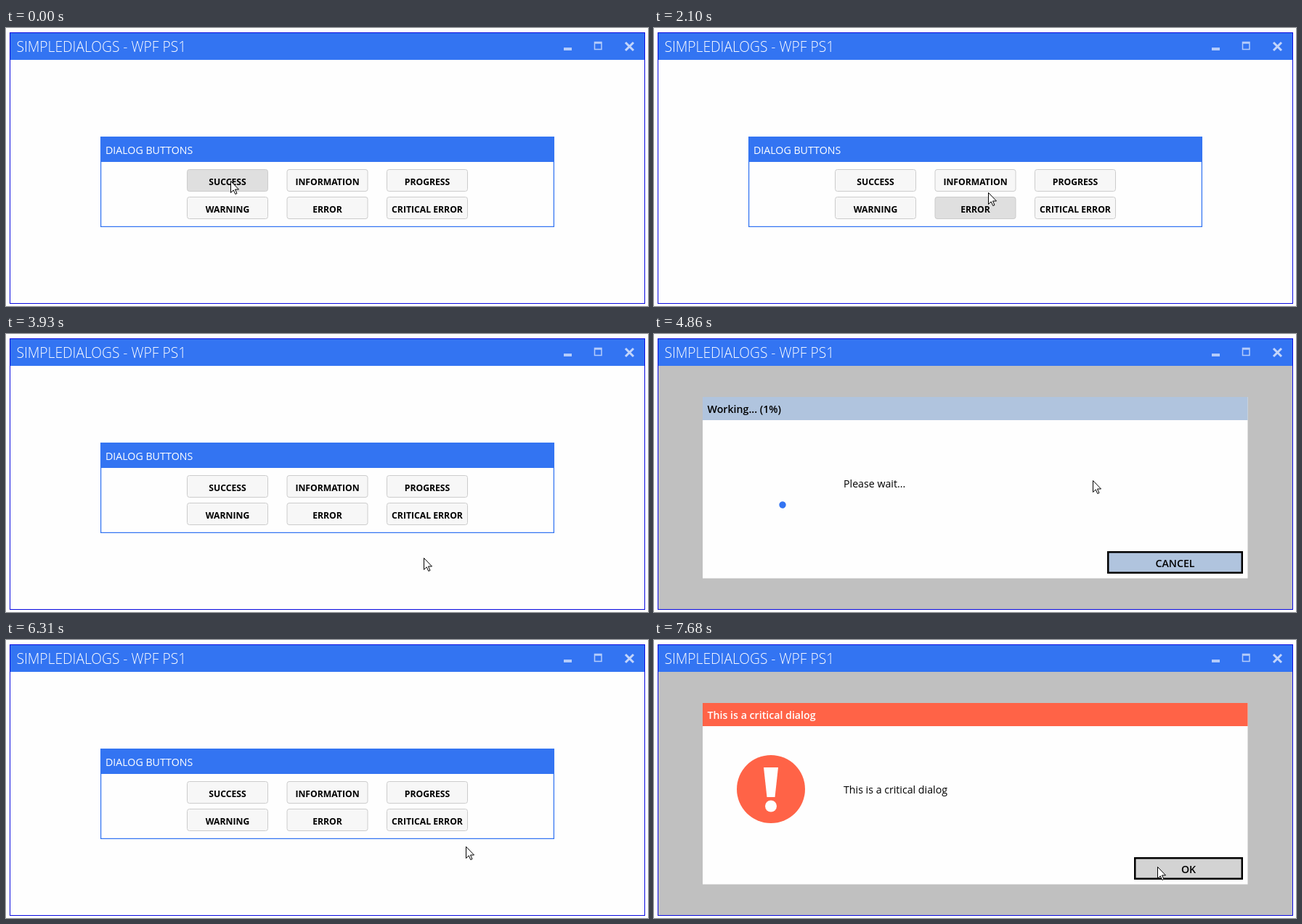
Animation of 884x384 px, one loop 8 s. Source, as an HTML page:

```html
<!DOCTYPE html>
<html lang="en">
<head>
<meta charset="utf-8">
<title>Dialogs</title>
<style>
  html, body { margin: 0; width: 100%; height: 100%; overflow: hidden; background: #fefefe; }
  svg { display: block; width: 884px; height: 384px; font-family: "Open Sans", "Noto Sans", sans-serif; font-size: 14.2px; }
  .caption { font-size: 12.2px; font-weight: 700; text-anchor: middle; }
  .strong { font-weight: 600; }
  .middle { text-anchor: middle; }
</style>
</head>
<body>
<svg id="stage" viewBox="0 0 884 384"></svg>
<script>
const LOOP = 8000;
const BLUE = '#3374f2', PAPER = '#fefefe', HOVER = '#d3d3d3';
const HOVER_LAG = 45;
const SPIN_START = 4710;

// Pointer path: time, x, y
const PATH = [
  [0, 309, 211], [59, 309, 211], [60, 308, 210], [630, 308, 210],
  [850, 490, 262], [1060, 659, 307], [1250, 690, 315], [1670, 690, 315],
  [1880, 585, 276], [2060, 468, 234], [2100, 460, 227], [2370, 452, 215],
  [2870, 452, 215], [3200, 532, 276], [3510, 575, 309], [3990, 575, 309],
  [4220, 590, 252], [4440, 604, 202], [5050, 604, 202], [5600, 652, 314],
  [5700, 655, 315], [6130, 655, 315], [6310, 633, 285], [6480, 624, 263],
  [6750, 599, 251], [7250, 599, 251], [7680, 693, 313], [8000, 693, 313]
];

const CHECK = 'M10 17l-5-5 1.41-1.41L10 14.17l7.59-7.59L19 8z';
const INFO = 'M11 7h2v2h-2zM11 11h2v6h-2z';
const materialIcon = d =>
  `<path d="${d}" fill="${PAPER}" transform="translate(161 206) scale(4.7) translate(-12 -12)"/>`;
const exclamation =
  `<path d="M151 176H171L166.500 217H155.500Z" fill="${PAPER}"/><circle cx="161" cy="229.500" r="8" fill="${PAPER}"/>`;

const DIALOGS = [
  { from: 440, to: 1440, color: '#9acd32', ink: '#fff', title: 'This is a success dialog',
    icon: materialIcon(CHECK), buttons: [['OK', 661, 150]], overlay: true },
  { from: 2510, to: 3930, color: '#6495ed', ink: '#fff', title: 'This is an information dialog',
    icon: materialIcon(INFO), buttons: [['OK', 505, 150], ['CANCEL', 661, 150]], overlay: false },
  { from: 4860, to: 6130, color: '#b0c4de', ink: '#000', title: 'Working... (1%)', text: 'Please wait...',
    spinner: true, buttons: [['CANCEL', 624, 187]], overlay: true },
  { from: 6960, to: LOOP, color: '#ff6347', ink: '#fff', title: 'This is a critical dialog',
    icon: exclamation, buttons: [['OK', 661, 150]], overlay: true }
];

const MENU = ['SUCCESS', 'INFORMATION', 'PROGRESS', 'WARNING', 'ERROR', 'CRITICAL ERROR'].map((label, i) => ({
  label, x: 249 + (i % 3) * 137.5, y: 195 + Math.floor(i / 3) * 38, w: 112, h: 31
}));

const rect = (x, y, w, h, attrs) => `<rect x="${x}" y="${y}" width="${w}" height="${h}" ${attrs}/>`;
const text = (x, y, label, attrs = '') => `<text x="${x}" y="${y}" ${attrs}>${label}</text>`;

const windowFrame = () =>
  rect(5.5, 6.5, 874, 374, `fill="${PAPER}" stroke="#0a0ae0"`) +
  rect(6, 7, 873, 37, `fill="${BLUE}"`) +
  text(14.5, 33, 'SIMPLEDIALOGS - WPF PS1', 'font-size="19.2" font-weight="300" fill="#fff"') +
  rect(768, 27, 11, 4, 'fill="#b4cbfa"') +
  '<path d="M810.500 19.500H820V29.500H810.500ZM810 21H820.500" fill="none" stroke="#b4cbfa" stroke-width="1.500"/>' +
  '<path d="M853 20L864 31M864 20L853 31" stroke="#c3d5fb" stroke-width="3"/>';

const panel = () =>
  rect(130.6, 150.6, 623.8, 123.8, `fill="${PAPER}" stroke="${BLUE}" stroke-width="1.25"`) +
  rect(130, 150, 625, 35, `fill="${BLUE}"`) +
  text(137, 173.5, 'DIALOG BUTTONS', 'fill="#fff"') +
  MENU.map(b =>
    rect(b.x + 0.5, b.y + 0.5, b.w - 1, b.h - 1, 'class="menu" rx="3" stroke="#ccc"') +
    text(b.x + b.w / 2, b.y + 21.5, b.label, 'class="caption"')).join('');

const dialogButton = ([label, x, w]) =>
  rect(x + 1.25, 301.25, w - 2.5, 28.5, 'class="action" stroke="#000" stroke-width="2.5"') +
  text(x + w / 2, 321.5, label, 'class="strong middle"');

const dialog = d =>
  '<g class="dialog">' +
  (d.overlay ? rect(6, 44, 873, 336, 'fill="#c0c0c0"') : '') +
  rect(67, 87, 750.5, 250.5, `fill="${PAPER}"`) +
  rect(67, 87, 750.5, 32, `fill="${d.color}"`) +
  text(73.5, 109, d.title, `class="title strong" fill="${d.ink}"`) +
  (d.icon ? `<circle cx="161" cy="206" r="47" fill="${d.color}"/>${d.icon}` : '') +
  (d.spinner ? `<circle class="dot" cx="161" cy="172" r="4.7" fill="${BLUE}"/>`.repeat(5) : '') +
  text(261, 212, d.text || d.title) +
  d.buttons.map(dialogButton).join('') + '</g>';

const stage = document.getElementById('stage');
stage.innerHTML = windowFrame() + panel() + DIALOGS.map(dialog).join('') +
  '<path id="pointer" d="M.5.5V16.500L4.200 12.900L6.800 18.500L9 17.500L6.500 12H11.500Z" fill="#fff" stroke="#000"/>';

const all = (selector, root = stage) => [...root.querySelectorAll(selector)];
const menuRects = all('.menu');
const pointerEl = stage.querySelector('#pointer');
const dots = all('.dot');
all('.dialog').forEach((el, i) => {
  DIALOGS[i].el = el;
  DIALOGS[i].actions = all('.action', el);
  DIALOGS[i].titleEl = el.querySelector('.title');
});

// Monotone cubic interpolation keeps rests still and moves free of overshoot.
const slope = (i, axis) => (PATH[i + 1][axis] - PATH[i][axis]) / (PATH[i + 1][0] - PATH[i][0]);
function tangent(i, axis) {
  if (i === 0 || i === PATH.length - 1) return 0;
  const a = slope(i - 1, axis), b = slope(i, axis);
  return a * b > 0 ? 2 * a * b / (a + b) : 0;
}
function pointerAt(time) {
  const t = Math.max(0, time);
  let i = 0;
  while (i < PATH.length - 2 && PATH[i + 1][0] <= t) i++;
  const span = PATH[i + 1][0] - PATH[i][0], u = (t - PATH[i][0]) / span, v = 1 - u;
  return [1, 2].map(axis => Math.round(
    PATH[i][axis] * (1 + 2 * u) * v * v + PATH[i + 1][axis] * (3 - 2 * u) * u * u +
    span * u * v * (tangent(i, axis) * v - tangent(i + 1, axis) * u)));
}

const inside = ([px, py], x, y, w, h) => px >= x && px < x + w && py >= y && py < y + h;

// Fast entry, slow drift, then acceleration towards the top.
function spinAngle(s) {
  if (s < 0.433) return 85 + 120 * (1 - Math.pow(1 - s / 0.433, 1.9));
  if (s < 1.2) return 205 + 83 * (s - 0.433) / 0.767;
  return 288 + 112 * Math.pow((s - 1.2) / 0.417, 1.7);
}

function draw(t) {
  const [x, y] = pointerAt(t);
  const felt = pointerAt(t - HOVER_LAG);
  pointerEl.setAttribute('transform', `translate(${x} ${y})`);
  MENU.forEach((b, i) =>
    menuRects[i].setAttribute('fill', inside(felt, b.x, b.y, b.w, b.h) ? '#dfdfdf' : '#f7f7f7'));

  for (const d of DIALOGS) {
    const open = t >= d.from && t < d.to;
    d.el.setAttribute('display', open ? 'inline' : 'none');
    if (!open) continue;
    d.buttons.forEach(([, bx, w], i) =>
      d.actions[i].setAttribute('fill', inside(felt, bx, 300, w, 31) ? HOVER : d.color));
    if (!d.spinner) continue;
    d.titleEl.textContent = `Working... (${1 + Math.floor((t - d.from) / 70)}%)`;
    dots.forEach((dot, i) => {
      const s = (t - SPIN_START) / 1000 - i * 0.167;
      dot.setAttribute('display', s >= 0 ? 'inline' : 'none');
      dot.setAttribute('transform', `rotate(${spinAngle(Math.max(0, s)) - 6 * i} 161 206)`);
    });
  }
}

const start = performance.now();
function tick() {
  draw((performance.now() - start) % LOOP);
  requestAnimationFrame(tick);
}
tick();
</script>
</body>
</html>
```
